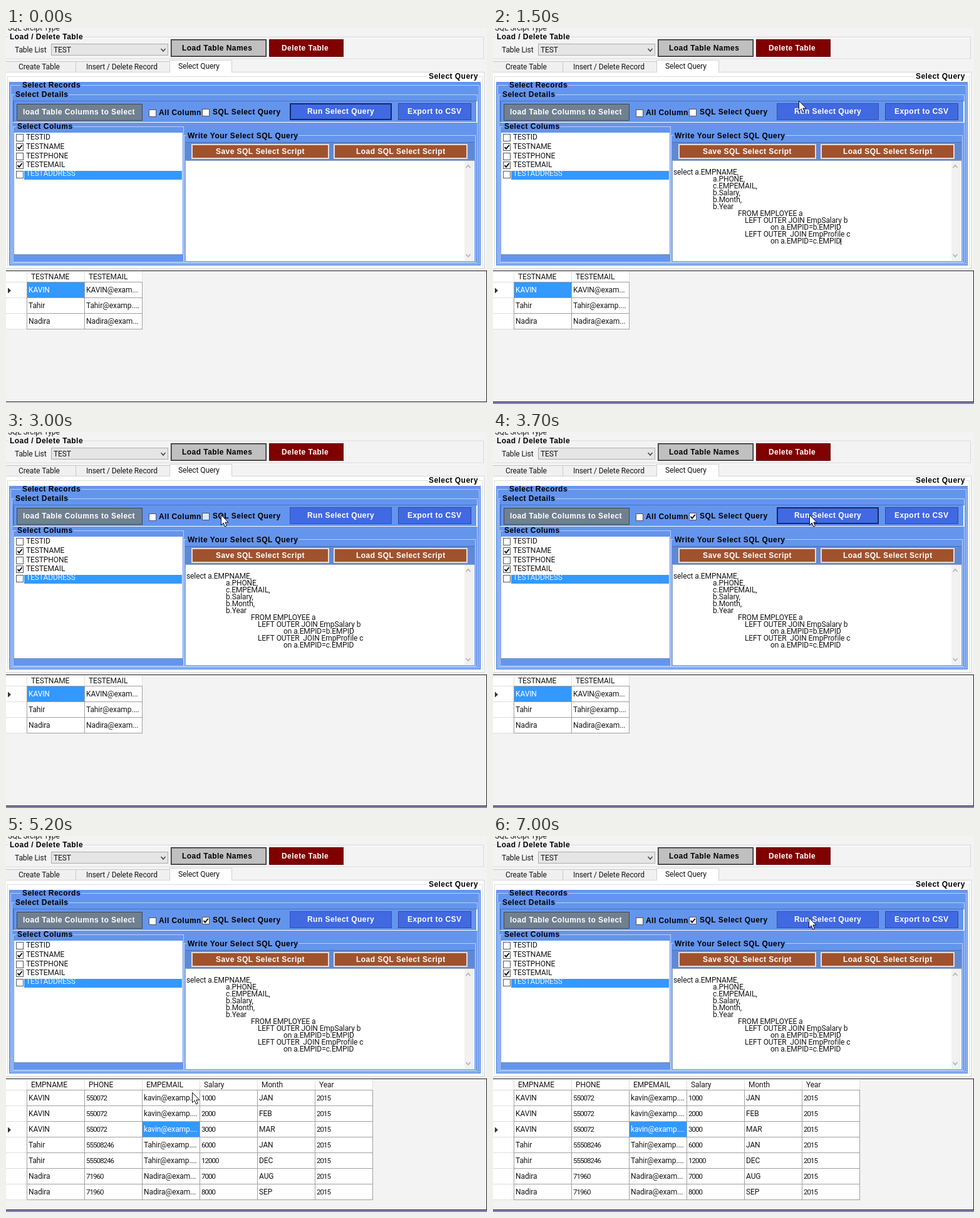
An HTML page with a canvas for the animation above (7100 ms loop, 768x600 px).

```html
<!DOCTYPE html>
<html lang="en">
<head>
<meta charset="utf-8">
<title>Select query form</title>
<style>
  html, body { margin: 0; width: 100%; height: 100%; overflow: hidden; background: #f3f3f3; }
  canvas { display: block; width: 768px; height: 600px; }
</style>
</head>
<body>
<canvas id="stage" width="768" height="600"></canvas>
<script>
const ctx = document.getElementById('stage').getContext('2d');
const LOOP = 7100, STEP = 100;
const BLUE = '#6495ed', ROYAL = '#4169e1', PICK = '#3399ff';

// Moments at which the form changes state
const WINDOW_BAR = 700, TEXT_FOCUS = 800, PASTE = 900, CHECK = 3300,
      RUN_CLICK = 3700, RESULT = 3900, CELL_CLICK = 4900, BLINK = 500;

// Pointer positions: time, x, y
const PATH = [
  [200, 540, 142], [600, 393, 294], [900, 393, 294], [1100, 402, 312], [1500, 488, 117],
  [1800, 500, 128], [2200, 452, 130], [2700, 350, 132], [3000, 343, 133], [3200, 322, 134],
  [3400, 322, 134], [3700, 505, 133], [3900, 505, 133], [4500, 544, 487], [4800, 264, 470],
  [5000, 264, 470], [5400, 330, 350], [5800, 390, 241], [6200, 390, 241], [6700, 476, 180],
  [7000, 504, 131]
];

const COLUMN = 92, ROW = 25, GRID_X = 33, GRID_Y = 405;
const BEFORE = {
  heads: ['TESTNAME', 'TESTEMAIL'],
  rows: [['KAVIN', 'KAVIN@exam...'], ['Tahir', 'Tahir@examp....'], ['Nadira', 'Nadira@exam...']]
};
const people = {
  KAVIN: ['550072', 'kavin@examp....'],
  Tahir: ['55508246', 'Tahir@examp....'],
  Nadira: ['71960', 'Nadira@exam...']
};
const salaries = [
  ['KAVIN', '1000', 'JAN'], ['KAVIN', '2000', 'FEB'], ['KAVIN', '3000', 'MAR'],
  ['Tahir', '6000', 'JAN'], ['Tahir', '12000', 'DEC'],
  ['Nadira', '7000', 'AUG'], ['Nadira', '8000', 'SEP']
];
const AFTER = {
  heads: ['EMPNAME', 'PHONE', 'EMPEMAIL', 'Salary', 'Month', 'Year'],
  rows: salaries.map(([name, pay, month]) => [name, ...people[name], pay, month, '2015'])
};

const QUERY = [
  [288, 'select a.EMPNAME,'], [351, 'a.PHONE,'], [351, 'c.EMPEMAIL,'], [351, 'b.Salary,'],
  [351, 'b.Month,'], [351, 'b.Year'], [391, 'FROM EMPLOYEE a'],
  [402, 'LEFT OUTER JOIN EmpSalary b'], [443, 'on a.EMPID=b.EMPID'],
  [402, 'LEFT OUTER  JOIN EmpProfile c'], [443, 'on a.EMPID=c.EMPID']
];

function fill(x, y, w, h, color) {
  ctx.fillStyle = color;
  ctx.fillRect(x, y, w, h);
}

function box(x, y, w, h, color, edge, weight = 1) {
  fill(x, y, w, h, edge);
  fill(x + weight, y + weight, w - 2 * weight, h - 2 * weight, color);
}

function outline(x, y, w, h, color) {
  ctx.strokeStyle = color;
  ctx.lineWidth = 1;
  ctx.strokeRect(x + .5, y + .5, w - 1, h - 1);
}

function line(points, color, weight = 1) {
  ctx.beginPath();
  points.forEach(([x, y]) => ctx.lineTo(x, y));
  ctx.strokeStyle = color;
  ctx.lineWidth = weight;
  ctx.stroke();
}

function text(label, x, y, color = '#161616') {
  const number = /^\d+$/.test(label);
  ctx.font = (number ? '11.5px' : '12px') + ' Roboto, sans-serif';
  ctx.letterSpacing = number ? '-0.95px' : '-0.1px';
  ctx.fillStyle = color;
  ctx.fillText(label, x, y);
}

function bold(label, x, y, color = '#000') {
  ctx.font = 'bold 12px "Liberation Sans", sans-serif';
  ctx.letterSpacing = '0.45px';
  ctx.fillStyle = color;
  ctx.fillText(label, x, y);
}

// Group title that interrupts the frame line behind it
function title(label, x, y, back) {
  ctx.font = 'bold 12px "Liberation Sans", sans-serif';
  ctx.letterSpacing = '0.45px';
  fill(x - 2, y - 9, ctx.measureText(label).width + 3, 11, back);
  bold(label, x, y);
}

function checkbox(x, y, checked, back = '#fff') {
  box(x, y, 12, 12, back, '#555');
  if (checked) line([[x + 2.5, y + 6], [x + 5, y + 8.8], [x + 9.7, y + 2.8]], '#111', 1.9);
}

function chevron(x, y, dir, color, size = 3.5) {
  line([[x - size, y - dir * 2], [x, y + dir * 2], [x + size, y - dir * 2]], color, 1.5);
}

function drawTop() {
  fill(0, 0, 768, 600, '#f3f3f3');
  text('SQL Srcipt Type', 3, 4);
  fill(0, 14, 763, 1, '#d5d5d5');
  fill(0, 15, 763, 1, '#fff');
  title('Load / Delete Table', 6, 18, '#f3f3f3');
  fill(0, 49, 763, 1, '#d8d8d8');
  fill(0, 50, 763, 1, '#fff');
  fill(762, 14, 1, 36, '#d8d8d8');
  text('Table List', 14, 39);
  box(72, 25, 187, 19, '#e5e5e5', '#adadad');
  text('TEST', 76, 39);
  chevron(251, 35, 1, '#444');
  box(263, 18, 153, 28, '#c0c0c0', '#222');
  outline(264, 19, 151, 26, '#777');
  bold('Load Table Names', 281, 36);
  box(420, 18, 119, 28, '#800000', '#5a0000');
  bold('Delete Table', 440, 36, '#fff');

  box(-1, 53, 113, 18, '#f0f0f0', '#c8c8c8');
  box(111, 53, 151, 18, '#f0f0f0', '#c8c8c8');
  text('Create Table', 20, 66);
  text('Insert / Delete Record', 128, 66);
  box(-1, 70, 765, 314, '#fff', '#d5d5d5');
  box(261, 51, 100, 20, '#fff', '#d0d0d0');
  fill(262, 69, 98, 3, '#fff');
  text('Select Query', 275, 65);
}

function drawPanels() {
  fill(3, 77, 757, 1, '#dcdcdc');
  fill(2, 77, 1, 304, '#dcdcdc');
  fill(760, 77, 1, 304, '#dcdcdc');
  title('Select Query', 675, 81, '#fff');
  fill(5, 86, 753, 293, BLUE);
  outline(7, 91, 749, 286, '#b9cff5');
  title('Select Records', 26, 95, BLUE);
  outline(9, 106, 744, 269, '#b9cff5');
  title('Select Details', 15, 110, BLUE);
  fill(11, 116, 741, 35, BLUE);
  fill(11, 116, 741, 1, '#4775c8');
  fill(11, 116, 2, 35, '#4775c8');
  fill(11, 150, 741, 1, '#fff');
  fill(751, 117, 2, 34, '#fff');

  outline(11, 157, 273, 217, '#b9cff5');
  title('Select Colums', 18, 161, BLUE);
  fill(13, 167, 269, 194, '#fff');
  fill(13, 361, 269, 1, '#7890b8');
  outline(284, 171, 466, 203, '#b9cff5');
  title('Write Your Select SQL Query', 290, 176, BLUE);
  fill(286, 182, 462, 29, '#6089d4');
  fill(286, 182, 462, 1, '#486fb7');
  for (const [x, w, label, at] of [
    [296, 220, 'Save SQL Select Script', 335], [523, 214, 'Load SQL Select Script', 559]
  ]) {
    box(x, 185, w, 24, '#a0522d', '#e7ddd8', 2);
    bold(label, at, 201, '#fff');
  }
}

function drawToolbar(t, pointer) {
  box(17, 121, 201, 27, '#708090', '#40464d');
  bold('load Table Columns to Select', 27, 138, '#fff');
  checkbox(228, 130, false);
  bold('All Column', 244, 139);
  const hover = pointer && inside(pointer, 313, 126, 124, 17);
  checkbox(313, 129, t >= CHECK, hover ? '#d3eaff' : '#fff');
  bold('SQL Select Query', 330, 138);
  const focused = t < TEXT_FOCUS || (t >= RUN_CLICK && t < CELL_CLICK);
  box(453, 120, 163, 27, ROYAL, focused ? '#14276f' : '#3552b4', focused ? 2 : 1);
  bold('Run Select Query', 481, 137, '#fff');
  box(626, 120, 117, 27, ROYAL, '#3048a0');
  bold('Export to CSV', 641, 137, '#fff');
}

function drawColumnList() {
  ['TESTID', 'TESTNAME', 'TESTPHONE', 'TESTEMAIL', 'TESTADDRESS'].forEach((name, i) => {
    const y = Math.round(169 + i * 14.8), picked = i === 4;
    if (picked) fill(29, 228, 252, 14, PICK);
    checkbox(16, y, i % 2 === 1);
    text(name, 32, y + (picked ? 8 : 9), picked ? '#e4f1ff' : '#161616');
  });
}

function drawEditor(t, pointer) {
  fill(286, 211, 462, 161, '#fff');
  fill(286, 211, 462, 1, '#8b9dbd');
  fill(286, 211, 1, 161, '#9cadc9');
  fill(732, 212, 15, 159, '#f1f1f1');
  chevron(738, 221, -1, '#b0b0b0');
  chevron(738, 363, 1, '#b0b0b0');
  if (t > CELL_CLICK && pointer && overEditor(pointer)) outline(286, 211, 462, 161, '#7eb4ea');
  if (t < PASTE) return;
  QUERY.forEach(([x, label], i) => text(label, x, 234 + i * 11));
  if (t < CHECK - STEP && Math.floor(t / BLINK) % 2) fill(555, 335, 1, 11, '#000');
}

function drawGrid(t) {
  const { heads, rows } = t < RESULT ? BEFORE : AFTER;
  const [pickRow, pickColumn] = t < CELL_CLICK ? [0, 0] : [2, 2];
  const right = GRID_X + heads.length * COLUMN, bottom = GRID_Y + rows.length * ROW;
  box(-1, 387, 769, 210, '#f3f3f3', '#222');
  fill(0, 388, right, bottom - 388, '#fff');
  heads.forEach((head, c) => {
    const x = GRID_X + c * COLUMN;
    fill(x, 389, 1, 16, '#dedede');
    text(head, x + 7, 401);
  });
  fill(right, 389, 1, 16, '#dedede');
  rows.forEach((row, r) => row.forEach((value, c) => {
    const x = GRID_X + c * COLUMN, y = GRID_Y + r * ROW;
    const picked = r === pickRow && c === pickColumn;
    if (picked) fill(x, y, COLUMN, ROW, PICK);
    text(value, x + 3, y + 17, picked ? '#fff' : '#161616');
  }));
  for (let r = 0; r <= rows.length; r++) {
    fill(0, GRID_Y + r * ROW, GRID_X, 1, '#dedede');
    fill(GRID_X, GRID_Y + r * ROW, right - GRID_X + 1, 1, '#a0a0a0');
  }
  for (let x = GRID_X; x <= right; x += COLUMN) fill(x, GRID_Y, 1, bottom - GRID_Y, '#a0a0a0');
  const y = GRID_Y + pickRow * ROW + 14;
  ctx.beginPath();
  ctx.moveTo(3, y - 4.5);
  ctx.lineTo(8, y);
  ctx.lineTo(3, y + 4.5);
  ctx.fillStyle = '#333';
  ctx.fill();
  fill(0, 597, 768, 3, t < WINDOW_BAR ? '#e6e6ec' : '#8681b6');
}

function inside([px, py], x, y, w, h) {
  return px >= x && px < x + w && py >= y && py < y + h;
}

function overEditor(point) {
  return inside(point, 286, 211, 446, 161);
}

function pointerAt(t) {
  const next = PATH.findIndex(stop => stop[0] >= t);
  if (next < 1) return null;
  const [t0, x0, y0] = PATH[next - 1], [t1, x1, y1] = PATH[next];
  const p = (t - t0) / (t1 - t0), ease = p * p * (3 - 2 * p);
  return [Math.round(x0 + (x1 - x0) * ease), Math.round(y0 + (y1 - y0) * ease)];
}

function drawPointer(point) {
  const [x, y] = point;
  if (overEditor(point)) {
    fill(x, y - 5, 1, 11, '#222');
    for (const dy of [-6, 6]) {
      fill(x - 3, y + dy, 3, 1, '#222');
      fill(x + 1, y + dy, 3, 1, '#222');
    }
    return;
  }
  const arrow = new Path2D('M0 0V16L3.7 12.5L6.2 18.5L8.9 17.3L6.4 11.6H11.4Z');
  ctx.save();
  ctx.translate(x + .5, y - .5);
  ctx.fillStyle = '#fff';
  ctx.fill(arrow);
  ctx.strokeStyle = '#111';
  ctx.lineWidth = 1;
  ctx.stroke(arrow);
  ctx.restore();
}

const started = performance.now();
function render() {
  const now = Math.max(0, performance.now() - started) % LOOP;
  const t = Math.floor(now / STEP) * STEP;
  const pointer = pointerAt(t);
  drawTop();
  drawPanels();
  drawToolbar(t, pointer);
  drawColumnList();
  drawEditor(t, pointer);
  drawGrid(t);
  if (pointer) drawPointer(pointer);
  requestAnimationFrame(render);
}
render();
</script>
</body>
</html>
```
